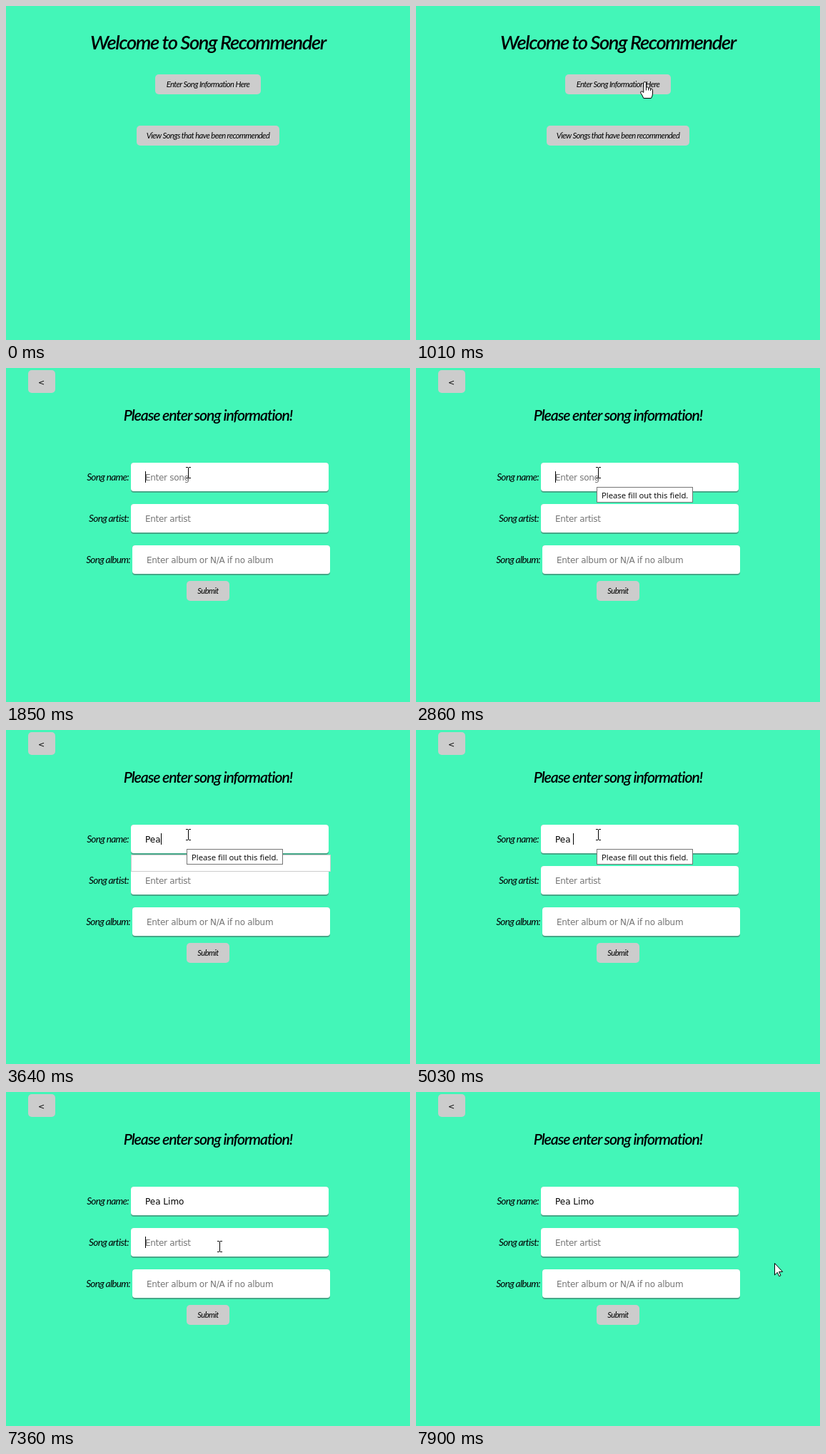
Write an HTML page that moves like this. It is 566 px wide and 469 px high and loops after 8 s.

```html
<!DOCTYPE html>
<html lang="en">
<head>
<meta charset="utf-8">
<title>Song Recommender</title>
<style>
  html, body { margin: 0; width: 100%; height: 100%; overflow: hidden; background: #43f6b8; }
  svg { display: block; width: 566px; height: 469px; }
  text { white-space: pre; }
  .hand { font: italic 11.2px Lato, sans-serif; letter-spacing: -.05em; text-anchor: middle; }
  .h1 { font-size: 27.3px; font-weight: 600; letter-spacing: -.05em; }
  .h2 { font-size: 21.2px; font-weight: 600; letter-spacing: -.05em; }
  .label { font-size: 13.6px; letter-spacing: -.05em; text-anchor: end; }
  .button { fill: #ccc; }
  .field { fill: #fff; }
  .edge { fill: #46a888; }
  .ui { font: 12px "DejaVu Sans", sans-serif; }
  .hint { fill: #757575; letter-spacing: -.3px; }
  .tip { font: 11.35px "Open Sans", sans-serif; }
  .box { fill: #fff; stroke: #767676; }
  .pointer { fill: #fff; stroke: #000; stroke-linejoin: round; }
  .beam { fill: none; stroke: #000; }
</style>
</head>
<body>
<svg viewBox="0 0 566 469">
  <g id="home">
    <text class="hand h1" x="283" y="61">Welcome to Song Recommender</text>
    <rect class="button" x="209" y="96" width="148" height="28" rx="5"/>
    <text class="hand" x="283" y="114">Enter Song Information Here</text>
    <rect class="button" x="183" y="168" width="200" height="28" rx="5"/>
    <text class="hand" x="283" y="186">View Songs that have been recommended</text>
  </g>

  <g id="form" visibility="hidden">
    <rect class="button" x="31" y="3" width="38" height="32" rx="5"/>
    <text class="ui" x="45" y="24" style="font-size:11px">&lt;</text>
    <text class="hand h2" x="283" y="74">Please enter song information!</text>
    <g id="rows"></g>
    <rect class="button" x="253" y="299" width="60" height="28" rx="5"/>
    <text class="hand" x="283" y="317">Submit</text>
    <text id="value" class="ui" x="195" y="158"></text>
    <rect id="caret" width="1" height="16"/>
  </g>

  <rect id="list" class="box" x="175.5" y="175.5" width="279" height="23" style="stroke:#ccc"/>
  <g id="tip">
    <rect class="box" x="253.5" y="167.5" width="134" height="21"/>
    <text class="tip" x="260" y="183">Please fill out this field.</text>
  </g>

  <g id="cursor">
    <path id="arrow" class="pointer" d="M.5.5V17l3.8-3.7 2.4 5.4 2.3-1-2.4-5.3h5z"/>
    <path id="finger" class="pointer" d="M-1.2 15.5V2.3Q-1.2.5.6.5T2.4 2.3V8q2.6-1 3.2 1 2.6-.8 3 1.2 2.8-.6 2.9 2V17q0 3-2 6.5H-1.2Q-2.5 20-5 16.5q-1-2 .5-2.6 1.8-.4 3.3 1.6zM2.4 8v4.5M5.6 9v3.5M8.6 10.2V13"/>
    <path id="beam" class="beam" d="M-3-7.5H0M1-7.5H4M.5-7V7M-3 7.5H0M1 7.5H4"/>
  </g>
</svg>
<script>
const LOOP = 8000, FRAME = 77, BLINK = 530;
const FORM_AT = 1160, FOCUS_AT = 1790, NEXT_FIELD_AT = 7210;
const TITLE = "Pea Limo";
const keys = [3010, 3560, 3640, 4100, 5260, 5660, 5810, 5890];

const $ = id => document.getElementById(id);
const show = (id, on) => $(id).setAttribute("visibility", on ? "visible" : "hidden");
const place = (id, x, y) => $(id).setAttribute("transform", `translate(${x} ${y})`);

// Form rows, 58px apart
const rowY = i => 133 + 58 * i;
$("rows").innerHTML = [
  ["name", "Enter song", 175],
  ["artist", "Enter artist", 175],
  ["album", "Enter album or N/A if no album", 177]
].map(([name, hint, x], i) => `<g transform="translate(${x} ${rowY(i)})">
  <text class="hand label" x="-3" y="25">Song ${name}:</text>
  <rect class="edge" width="277" height="42" rx="4"/>
  <rect class="field" width="277" height="40" rx="4"/>
  <text id="hint-${name}" class="ui hint" x="20" y="25">${hint}</text></g>`).join("");

// Pointer glides: start, end, from, to
const glides = [
  [150, 690, [472, 456], [320, 106]],
  [FORM_AT, 1540, [320, 106], [255, 147]],
  [6740, 6980, [262, 160], [290, 206]],
  [7360, 7900, [299, 217], [502, 240]]
];

function pointerAt(t) {
  const glide = glides.filter(g => g[0] <= t).pop();
  if (!glide) return null;
  const [start, end, from, to] = glide;
  const p = Math.min(1, Math.floor((t - start) / FRAME) * FRAME / (end - start));
  const eased = p * p * (3 - 2 * p);
  return from.map((v, i) => Math.round(v + (to[i] - v) * eased));
}

function pointerKind(x, y, onForm) {
  const within = (top, height, left, width) =>
    y >= top && y < top + height && x >= left && x < left + width;
  if (onForm) return [0, 1, 2].some(i => within(rowY(i), 42, 175, 277)) ? "beam" : "arrow";
  return within(96, 28, 209, 148) || within(168, 28, 183, 200) ? "finger" : "arrow";
}

function drawPointer(t, onForm) {
  const pos = pointerAt(t);
  const kind = pos && pointerKind(...pos, onForm);
  if (pos) place("cursor", ...pos);
  for (const id of ["arrow", "finger", "beam"]) show(id, id === kind);
}

// A steady beat toggles the caret; a key press or focus change turns it on.
function drawCaret(t) {
  const beat = time => Math.floor((time - FOCUS_AT) / BLINK);
  const reset = [FOCUS_AT, ...keys, NEXT_FIELD_AT].filter(k => k <= t).pop();
  show("caret", reset && (beat(t) - beat(reset)) % 2 === 0);
  const moved = t >= NEXT_FIELD_AT;
  place("caret", 195 + (moved ? 0 : Math.round($("value").getComputedTextLength())), rowY(+moved) + 12);
}

function draw(t) {
  const onForm = t >= FORM_AT;
  const typed = keys.filter(k => k <= t).length;
  show("home", !onForm);
  show("form", onForm);
  show("hint-name", onForm && !typed);
  show("list", t >= keys[0] && t < 3720);
  show("tip", t >= 2630 && t < 6740);
  $("value").textContent = TITLE.slice(0, typed);
  drawCaret(t);
  drawPointer(t, onForm);
}

const begin = performance.now();
function tick() {
  draw((performance.now() - begin) % LOOP);
  requestAnimationFrame(tick);
}
tick();
</script>
</body>
</html>
```
